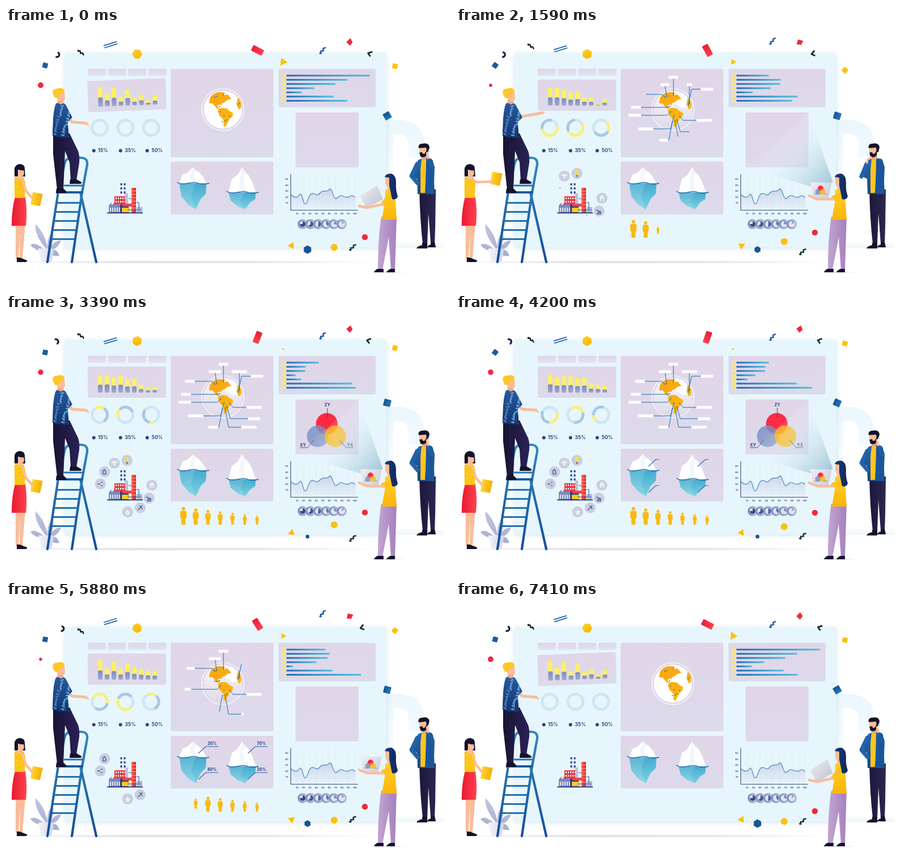
An HTML page with a canvas for the animation above (7440 ms loop, 782 by 457 pixels).

```html
<!DOCTYPE html>
<html lang="en">
<head>
<meta charset="utf-8">
<title>Dashboard team</title>
<style>
html, body { margin: 0; width: 100%; height: 100%; overflow: hidden; background: #fff; }
canvas { display: block; width: 782px; height: 457px; }
</style>
</head>
<body>
<canvas id="stage"></canvas>
<script>
const W = 782, H = 457, LOOP = 7440, TAU = Math.PI * 2, RAD = Math.PI / 180;
const canvas = document.getElementById('stage');
const dpr = window.devicePixelRatio || 1;
canvas.width = W * dpr;
canvas.height = H * dpr;
const c = canvas.getContext('2d');
let t = 0;

// ---- timing ----
const clamp = x => Math.max(0, Math.min(1, x));
const ease = x => { x = clamp(x); return x * x * (3 - 2 * x); };
const mix = (a, b, u) => a + (b - a) * u;
const env = (a, b, d, e) => ease((t - a) / (b - a)) * (1 - ease((t - d) / (e - d)));
const pop = x => { x = clamp(x) - 1; return 1 + 2.2 * x * x * x + 1.2 * x * x; };
// Cosine swing, n times per loop, highest at the given phase.
const sway = (mid, amp, peak = 0, n = 1) => mid + amp * Math.cos(n * TAU * t / LOOP - peak);

// ---- drawing helpers ----
function grad(x0, y0, x1, y1, ...cols) {
  const g = c.createLinearGradient(x0, y0, x1, y1);
  cols.forEach((k, i) => g.addColorStop(i / (cols.length - 1), k));
  return g;
}
function fill(d, col) { c.fillStyle = col; c.fill(new Path2D(d)); }
function stroke(d, col, w = 1) { c.strokeStyle = col; c.lineWidth = w; c.stroke(new Path2D(d)); }
function box(x, y, w, h, r, col) {
  c.fillStyle = col; c.beginPath(); c.roundRect(x, y, w, h, r); c.fill();
}
function disc(x, y, r, col) {
  c.fillStyle = col; c.beginPath(); c.arc(x, y, Math.max(0, r), 0, TAU); c.fill();
}
function ring(x, y, r, w, col, a = 0, b = TAU) {
  c.strokeStyle = col; c.lineWidth = w; c.beginPath(); c.arc(x, y, r, a, b); c.stroke();
}
function place(x, y, rot, s, draw) {
  c.save(); c.translate(x, y); c.rotate(rot * RAD); c.scale(s, s); draw(); c.restore();
}
function fade(a, draw) {
  if (a <= 0) return;
  c.save(); c.globalAlpha *= a; draw(); c.restore();
}
function text(s, x, y, size, col = '#36437f', align = 'center') {
  c.font = `700 ${size}px Inter, "Open Sans", sans-serif`;
  c.textAlign = align; c.textBaseline = 'middle'; c.fillStyle = col; c.fillText(s, x, y);
}
function poly(pts, col) {
  c.fillStyle = col; c.beginPath(); pts.forEach(p => c.lineTo(p[0], p[1])); c.closePath(); c.fill();
}
function ngon(n, r, col) {
  poly(Array.from({ length: n }, (_, i) => [r * Math.cos(i * TAU / n), r * Math.sin(i * TAU / n)]), col);
}
function limb(pts, w, col) {
  c.strokeStyle = col; c.lineWidth = w; c.beginPath();
  pts.forEach(p => c.lineTo(p[0], p[1])); c.stroke();
}
// Draws the first part u of a polyline.
function trace(pts, u, col, w = 1) {
  const len = pts.slice(1).map((p, i) => Math.hypot(p[0] - pts[i][0], p[1] - pts[i][1]));
  let left = clamp(u) * len.reduce((a, b) => a + b, 0);
  if (left <= 0) return;
  c.strokeStyle = col; c.lineWidth = w; c.beginPath(); c.moveTo(...pts[0]);
  for (let i = 0; i < len.length && left > 0; i++) {
    const k = Math.min(1, left / (len[i] || 1));
    c.lineTo(mix(pts[i][0], pts[i + 1][0], k), mix(pts[i][1], pts[i + 1][1], k));
    left -= len[i];
  }
  c.stroke();
}

const SKIN = '#f9bd9b', INK = '#14132b', GOLD = '#fdb813', BLUE = '#1c6cb0', RED = '#ee2a3d';

// ---- board ----
function backdrop() {
  c.fillStyle = '#fff'; c.fillRect(0, 0, W, H);
  fill('M668 162H694Q737 166 737 208V228H709V208Q709 187 690 187H682V300H668Z',
    grad(0, 163, 0, 300, '#eaf7fd', '#fbfeff'));
  box(668, 377, 104, 11, 2, grad(0, 377, 0, 388, '#fff', '#ecf6fc'));
  c.fillStyle = grad(10, 0, 655, 0, '#fff', '#dfe2ea', '#e4e7ee', '#fff');
  c.fillRect(10, 411, 645, 4);
  c.fillStyle = grad(640, 0, 705, 0, '#fff', '#dde0ea', '#fff');
  c.fillRect(640, 430, 65, 2);
  c.save();
  c.shadowColor = 'rgba(125,175,205,.32)'; c.shadowBlur = 8 * dpr; c.shadowOffsetY = 2 * dpr;
  box(103, 44, 567, 343, 5, '#e7f6fc');
  c.restore();
}
function panel(x, y, w, h) {
  box(x, y, w, h, 3, grad(0, y, 0, y + h, '#e1d6e8', '#dcdaeb'));
}
function tabs() {
  for (let i = 0; i < 4; i++)
    box(144 + i * 35.6, 72, 32, 12.5, 2, grad(0, 72, 0, 85, '#dfd5e8', '#e2e4f1'));
}

// Even columns stay tall, odd ones swell in turn from left to right.
function columns() {
  place(213, 118, -2.1 * (1 - env(500, 1350, 6250, 7100)), 1, () => {
    c.translate(-213, -118);
    panel(144, 91, 138, 55);
    for (let i = 0; i < 9; i++) {
      const odd = i % 2, tall = 30 - i * 1.6 - (i > 5 ? 7 : 0);
      const h = tall + (odd ? sway(-2, 7, 1.7 + .4 * i) : sway(3, 3, 5.5));
      const x = 162 + i * 12, top = 137 - h, mid = top + h * .54;
      box(x, top, 8, mid - top + 2, 1, '#fdef59');
      c.fillStyle = 'rgba(255,255,255,.4)';
      for (let y = top + 3; y < mid; y += 3) c.fillRect(x, y, 8, .7);
      box(x, mid, 8, 137 - mid, 2, grad(0, mid, 0, 137, '#7e8dbb', '#a4a9cb'));
    }
  });
}

function donuts() {
  const on = env(150, 1000, 6200, 7100);
  for (let i = 0; i < 3; i++) {
    const x = 165 + i * 45.3, turns = 2 - i / 2;
    const a = (turns * clamp((t - 1000) / 5300) - .25) * TAU;
    const len = on * (i < 2 ? 125 : 55) * RAD * sway(1, .45, 2.7, 2);
    ring(x, 176, 13.5, 5, '#cde6f5');
    if (on > .01) {
      ring(x, 176, 13.5, 5, '#a8c7e6', a + len, a + len + 2 * on);
      ring(x, 176, 13.5, 5, '#fcf078', a, a + len);
    }
    disc(154.7 + i * 47, 216.5, 3, '#36437f');
    text(`${[15, 35, 50][i]}%`, 162 + i * 47.3, 216.8, 8.5, '#36437f', 'left');
  }
}

// Upper rows stretch around the loop's end, the others drift.
function rows() {
  panel(480, 72, 171, 68);
  const burst = 1 - env(0, 1400, 5500, 7200);
  [57, 56, 55, 38, 20, 98, 117].forEach((rest, i) => {
    const drift = i > 4 ? sway(0, 20, 1.8 * i - 6.6)
      : i === 4 ? sway(0, 10, 1.9) : i ? sway(0, 22, 2.6, 2) : 0;
    const w = rest + drift + Math.max(0, 90 - 20 * i) * burst, y = 84 + i * 7.4;
    box(487, y - 2.5, 6, 5, 1, '#fbe966');
    c.fillStyle = grad(494, 0, 494 + w, 0, '#2469b4', '#55bfdd');
    c.fillRect(494, y - 1.5, w, 3);
  });
}

// Callouts: point on the globe, then the middle of the label.
const CALLS = [
  [383, 118, 383, 87], [409, 136, 442, 108], [394, 156, 437, 163], [376, 139, 317, 140],
  [378, 148, 315, 154], [384, 155, 334, 178], [381, 165, 365, 198], [371, 121, 368, 100],
  [411, 133, 411, 100], [368, 122, 324, 117], [389, 162, 437, 183], [386, 164, 428, 198]
];
function globe() {
  panel(290, 72, 181, 156);
  ring(382, 144, 37, 1.2, '#fff');
  disc(382, 144, 33.5, '#fff');
  const on = env(300, 1100, 6200, 7100);
  fade(on, () => {
    disc(382, 144, 33.5, grad(0, 115, 0, 175, 'rgba(222,216,233,.2)', 'rgba(222,216,233,.95)'));
    fill('M386 117L400 115 409 126 411 139 399 142 386 132Z', '#fff');
  });
  const land = grad(358, 115, 410, 175, '#f7a413', '#fdbb0f');
  fill('M358 133L359 124Q364 114 376 113L386 114 383 119 390 117 397 125 390 127 385 131 380 133 380 136 376 135 372 138 375 142 380 143 377 145 370 141 364 133Z', land);
  fill('M373 146L379 141 389 142 393 146 400 150 399 156 394 160 390 168 386 175 383 172 383 162 376 155Z', land);
  fill('M408 123Q416 130 414 141L410 144 406 134Z', land);
  CALLS.forEach(([x, y, lx, ly], i) => {
    const a = 700 + i * 60, b = 5200 + (i * 5 + 11) % 12 * 65;
    const g = env(a, a + 650, b, b + 700), w = 17 + i % 3 * 5;
    const side = Math.sign(lx - x), flat = Math.abs(lx - x) > 15;
    const end = lx - side * w / 2, bend = x + side * Math.min(6, Math.abs(lx - x));
    disc(x, y, .9, BLUE);
    trace([[x, y], [bend, ly], [flat ? end : lx, ly]], g * 1.7, BLUE);
    const k = ease(g * 2 - 1) * w;
    if (k > .4) box(flat ? end - (side < 0 ? k : 0) : lx - k / 2, ly - 2.6, k, 5.2, 1, '#fff');
  });
}

function berg(x, sea, top, low) {
  const up = sea - 246, down = 320 - sea;
  const above = (px, k) => [x + px, 246 + up * k], below = (px, k) => [x + px, sea + down * k];
  poly([above(0, 0), above(6, .2), above(11, .3), above(18, .6), above(24, 1), above(-24, 1), above(-18, .45), above(-9, .32)], '#fff');
  poly([above(0, 0), above(6, .2), above(2, .5), above(6, 1), above(-2, 1), above(-5, .6)], 'rgba(220,235,245,.4)');
  poly([below(-24, 0), below(24, 0), below(23, .4), below(14, .6), below(5, 1), below(-8, .82), below(-20, .5)],
    grad(0, sea, 0, 320, '#46a9cf', '#79d3e2'));
  poly([below(-24, 0), below(4, 0), below(-3, .5), below(5, 1), below(-8, .82), below(-20, .5)], 'rgba(255,255,255,.13)');
  place(x, sea, 0, 1, () => stroke('M-28 -2Q-20 3 -8 0T10 0T29 0', '#256ba4', 1.3));
  const g = env(3850, 4480, 6350, 7050);
  [[255, top], [301, low]].forEach(([y, s]) => {
    trace([[x + 10, y + 12], [x + 23, y], [x + 45, y]], g, '#236ba9', 1.1);
    fade(ease((g - .72) / .28), () => text(s, x + 34, y - 4.8, 7, '#283a83'));
  });
}

function lineChart() {
  const d = 'M502 294Q508 300 513 298C518 296 517 289 521 296C524 307 526 315 530 308C533 299 535 291 541 292S547 298 553 291S565 291 569 285C574 279 575 297 580 301C585 302 586 293 592 296S602 300 606 297S612 297 615 299';
  for (let i = 1; i <= 10; i++) stroke(`M${501.5 + i * 11.3} 260V320`, 'rgba(176,190,218,.25)', .7);
  fill(d + 'V320H502Z', grad(0, 284, 0, 320, 'rgba(176,178,215,.5)', 'rgba(222,226,243,.25)'));
  stroke(d, '#4b83b9', 1.2);
  stroke('M501.5 258V321.5H620', '#33507f', 1.1);
  for (let i = 1; i <= 10; i++) {
    if (i < 6) text(i * 10, 497, 319.5 - i * 10.5, 4.1, '#36437f', 'right');
    text(i * 10, 501.5 + i * 11.3, 327.5, 3.9);
  }
  for (let i = 0; i < 6; i++) {
    const x = 522.5 + i * 13.8;
    disc(x, 346, 8.8, grad(x - 8, 0, x + 8, 0, '#7d8bb9', '#b4bdda'));
    disc(x, 346, 5.6, '#dfe4f1');
    c.fillStyle = `hsl(224 ${45 - i * 4}% ${36 + i * 6}%)`; c.beginPath(); c.moveTo(x, 346);
    c.arc(x, 346, 5, -1.57, -1.3 + (6 - i) * .75); c.fill();
  }
}

function vennDots() {
  disc(0, -14, 19, 'rgba(255,28,54,.92)');
  disc(-16, 8, 19, 'rgba(123,145,197,.8)');
  disc(15, 8, 19, 'rgba(253,187,10,.8)');
}
function venn() {
  panel(510, 149, 111, 97);
  const g = env(1680, 2300, 5250, 5800), u = env(2000, 2500, 5200, 5550);
  if (g > .01) place(565, 206, 0, g, vennDots);
  trace([[566, 181], [566, 164]], u, '#283a83', .9);
  trace([[542, 221], [531, 234], [518, 234]], u, '#283a83', .9);
  trace([[588, 221], [599, 234], [612, 234]], u, '#283a83', .9);
  fade(ease(u * 2 - 1), () => {
    text('ZY', 566, 158.5, 7.5); text('XY', 523, 230, 7.5); text('YX', 606, 230, 7.5);
  });
}

function crowd() {
  for (let i = 0; i < 7; i++) {
    const s = pop((t - 1010 - i * 265) / 360) * (1 - ease((t - 5500 - i * 215) / 400));
    if (t < 1010 + i * 265 || s < .02) continue;
    const h = 31 - i * 2.5;
    place(312.5 + i * 21.6, 354.5 + i * 1.25, 0, s, () => {
      disc(0, -h * .41, h * .1, GOLD);
      box(-h * .18, -h * .29, h * .36, h * .44, h * .09, GOLD);
      box(-h * .12, 0, h * .24, h * .5, h * .05, GOLD);
    });
  }
}

// Two arcs of four badges around the plant: upper left, then lower right.
const GLYPHS = [
  'M-2 -1A3 3 0 1 1 2 -1L1 3H-1Z', 'M-4 -4V-1H4V-4M0 -5V3M-2 3H2', 'M-3 4V-2L0 -4 2 1V4Z', 'M-5 0H0M1 -3H4M1 3H4',
  'M-3 5L-1 -5M3 5L1 -5M-4 -1H4', 'M-5 -2L4 2M0 0L-3 5H3Z', 'M-4 4L4 -4M-1 -4L4 2', 'M-4 0H4M0 -4V0M-2 1V4H2V1'
];
function icons() {
  GLYPHS.forEach((d, i) => {
    const j = i % 4, a = j < 2 ? 780 : 1000 + 240 * j, b = 4850 + 580 * j;
    const s = env(a, a + 430, b, b + 480);
    if (s < .03) return;
    const ang = (i < 4 ? -88 - 29 * j : -2 + 29.5 * j) * RAD, r = 45.5 * (.7 + .3 * s);
    place(211.5 + r * Math.cos(ang), 302 + r * Math.sin(ang), 0, s, () => {
      disc(0, 0, 9.7, '#c9cee0');
      if (i) stroke(d, i % 3 === 1 ? '#fff' : '#4d5f9b', 1.5);
      else { fill(d, '#fce23a'); box(-1.3, 3, 2.6, 3, 0, '#526099'); }
    });
  });
}
function factory() {
  for (const x of [201.5, 207.5])
    for (let i = 0; i < 6; i++) box(x, 274 + i * 3.6, 3, 3.7, 0, i % 2 ? '#dfe5f2' : '#233e8d');
  box(191, 297, 24, 17, 0, '#e73442');
  for (let x = 193; x < 214; x += 4)
    for (const y of [299, 305]) box(x, y, 2, 3, 0, '#fff');
  box(210, 292, 5, 32, 0, '#c0bed8');
  box(221, 282, 8, 44, 1, grad(221, 0, 229, 0, '#ff5948', '#d72a36'));
  for (let y = 287; y < 323; y += 6) box(221, y, 8, 1.2, 0, '#ff9578');
  fill('M181 326V313L186 308V313L191 308V313L196 308V313L201 308V326Z', '#7d8ab9');
  for (let x = 183; x < 200; x += 4) box(x, 317, 2, 7, 0, '#dfe4f4');
  fill('M201 312H216V326H201Z', '#293e83');
  box(204, 317, 14, 8, 1, '#fbc928');
  box(205, 310, 17, 5, 0, '#ef4349');
  box(230, 316, 10, 10, 1, '#aab9da');
  stroke('M214 321H238M230 308H234V319M216 301H221', '#3456a2', 1.1);
  box(178, 325.5, 63, 1.8, 0, '#22377c');
}

// ---- people ----
function plant() {
  const leaf = grad(0, 345, 0, 405, '#c0c6e1', '#a5add1');
  fill('M70 389Q49 363 52 346Q69 363 73 388Z', leaf);
  fill('M73 390Q72 366 83 361Q86 376 76 391Z', leaf);
  fill('M67 390Q50 376 43 383Q50 393 67 393Z', leaf);
  fill('M75 391Q85 374 97 375Q93 388 77 394Z', leaf);
  fill('M75 394Q89 386 94 402Q84 404 75 397Z', leaf);
  fill('M57 389H85L80 413H62Z', grad(57, 0, 85, 0, '#f5f5fa', '#cfd3e7'));
}
function ladder() {
  const col = grad(0, 228, 0, 413, '#3288bd', '#144f9b');
  stroke('M131 290L159 413', col, 4.2);
  for (let i = 0; i < 5; i++) box(90 - i * 2.5, 307 + i * 16, 42 - i * .2, 3, 0, '#2070b0');
  stroke('M73 413L92 289L103 240Q105 229 116 229H132Q144 229 143 241L134 290L116 413', col, 4.2);
  stroke('M103 278H134', '#2877b1', 3);
  box(88, 288, 48, 4, 1, '#195ba0');
}
function climber() {
  fill('M83 186H112L127 217Q130 225 129 238L124 269H114L112 237 104 217 103 240 101 285H90Q86 250 83 222Z',
    grad(80, 0, 130, 0, '#171331', '#2b2257'));
  fill('M89 283H101L107 289Q107 291 104 291H88Z', INK);
  fill('M113 267H124L133 272Q134 275 130 275H112Z', INK);
  const u = env(500, 1250, 1700, 2500), hx = mix(141, 151, u), hy = mix(168, 150, u);
  limb([[104, mix(153, 151, u)], [116, mix(166, 156, u)], [hx, hy]], 5.2, SKIN);
  limb([[hx - 2, hy], [hx + 4, hy + mix(3, -1, u)]], 2.8, SKIN);
  c.save();
  c.beginPath();
  const shirt = new Path2D('M88 133Q98 128 105 135L113 150 117 158 109 166 111 193Q95 195 82 190Q82 145 88 133Z');
  c.clip(shirt);
  c.fillStyle = grad(0, 132, 0, 193, '#255a9f', '#16356f'); c.fill(shirt);
  for (let i = 0; i < 24; i++) {
    const x = 85 + i * 11 % 32, y = 136 + i * 17 % 56;
    place(x, y, i * 70, 1, () => fill('M-4 0Q0 -4 4 0Q0 3 -4 0Z', i % 3 ? '#5e9bcd' : '#3f7bb8'));
  }
  c.restore();
  fill('M91 122H101V133Q96 137 91 132Z', '#f0a987');
  fill('M89 113H103L104 123Q104 130 98 130 92 129 89 122Z', SKIN);
  fill('M83 117Q80 107 90 107Q101 104 103 111L102 116H95L92 124 86 123Z', '#fec727');
}
function readerWoman() {
  const u = env(450, 1300, 1800, 3350), x = mix(54, 71, u), y = mix(302, 266, u);
  fill('M17 346H34L29 407H24L25 360 22 407H17Z', SKIN);
  fill('M19 405H24L37 410Q38 413 34 413H19Z', INK);
  fill('M16 298H34Q38 324 35 349H10Q10 319 16 298Z', grad(10, 0, 37, 0, '#e9192f', '#ff4451'));
  fill('M15 264Q25 260 31 264L34 273 33 300H15Z', '#fcc415');
  for (let i = 0; i < 9; i++) disc(18 + i * 5 % 14, 268 + i * 7 % 30, .8, '#fff1a3');
  place(x, y, 10, 1, () => fill('M-9 -11H9L8 11H-9Z', grad(-9, 0, 9, 0, '#ffd426', '#f3ae09')));
  limb([[29, 268], [mix(35, 37, u), mix(287, 272, u)], [x - 8, y + mix(-2, 5, u)]], 4.3, SKIN);
  fill('M15 261V248Q17 240 25 240Q33 241 33 248L34 262H15Z', INK);
  fill('M20 250H31L32 256Q31 262 27 262V267H20Z', SKIN);
  fill('M19 247Q25 240 32 248L31 251Q25 252 21 249L21 261 15 262Z', INK);
}
function tabletWoman() {
  const beam = env(950, 1400, 5300, 5750);
  fade(beam, () => poly([[621, 151], [664, 272], [627, 280], [510, 246]],
    grad(650, 277, 560, 195, 'rgba(150,190,208,.75)', 'rgba(205,228,238,.4)', 'rgba(255,255,255,.05)')));
  fill('M661 333H688L685 427H678L674 369 663 427H655Q655 370 661 333Z', grad(655, 0, 688, 0, '#c1a5d3', '#a680bd'));
  fill('M654 425H665V431H648Q649 428 654 425Z', INK);
  fill('M677 425H685V431H670Q671 428 677 425Z', INK);
  fill('M668 286Q676 280 685 287L688 338H662L667 309Z', grad(0, 285, 0, 338, '#ffcf24', '#fbb50b'));
  const u = env(600, 1250, 5900, 6750), m = (a, b) => mix(a, b, u);
  const pts = [[m(624, 624), m(296, 272)], [m(654, 662), m(278, 273)], [m(664, 656), m(302, 300)], [m(635, 629), m(318, 300)]];
  poly(pts, grad(624, 272, 662, 305, '#f0f0f5', '#c8c9d6'));
  fade(env(800, 1250, 5950, 6500), () => {
    place(642, 287, 0, .27, () => {
      stroke('M-14 10L-27 22H-42M14 10L27 22H42M0 -17V-34', '#576aab', 3);
      vennDots();
    });
  });
  limb([[677, 296], [665, m(310, 300)]], 9, '#fdc11b');
  limb([[664, m(311, 302)], [636, m(317, 302)], [622, m(314, 296)]], 4.5, SKIN);
  fill('M668 261H678V283Q673 288 671 280L668 274Z', SKIN);
  fill('M667 263Q669 256 679 257Q687 260 687 273Q686 286 690 297Q688 304 680 302L675 278V264Z', grad(667, 0, 690, 0, '#173a79', '#14275c'));
}
function callerMan() {
  const u = env(800, 1300, 1850, 2500), nod = -3 * env(5350, 5800, 6000, 6700);
  fill('M728 285H757L756 351 755 380H748L744 327 742 381H734Q729 337 728 285Z', grad(727, 0, 758, 0, '#1a1739', '#2c2752'));
  fill('M733 379H742V389H723Q724 385 733 383Z', INK);
  fill('M748 378H755L757 387H742Q742 384 748 382Z', INK);
  fill('M726 233Q737 227 750 231L755 245 753 293H725L724 266 711 260Z', grad(0, 230, 0, 293, '#2466ac', '#184887'));
  fill('M732 231H741L738 291H730L730 249Z', '#fcc522');
  fill('M740 230L752 234 755 293H739Z', '#1b5599');
  place(735, 216, nod, 1, () => {
    c.translate(-735, -216);
    fill('M731 221H742V231Q736 235 732 230Z', '#eaa583');
    fill('M728 209H744L742 222 738 227Q733 228 730 224L728 219Z', SKIN);
    fill('M727 212Q725 204 734 204Q744 202 746 210L744 219H741L740 211Z', INK);
    fill('M728 220L733 219 734 222 737 222 741 216 741 224Q737 230 730 227Z', INK);
  });
  limb([[724, 240], [714, mix(261, 262, u)], [mix(725, 723, u), mix(274, 240, u)]], 7, '#2163aa');
  fade(u, () => limb([[724, 238], [725, 232], [731, 228]], 3.5, SKIN));
  fade(1 - u, () => {
    limb([[751, 246], [743, 231]], 6, '#1d5da3');
    limb([[743, 229], [742, 221]], 4.5, SKIN);
    place(744, 219, 18, 1, () => box(-1, -5, 2.6, 9, 1, '#e1e4ec'));
  });
}

// ---- confetti ----
const zigzag = col => stroke('M-6 4L-3 5L-3 1L2 1L2 -3L7 -4', col, 2.5);
const square = (r, col) => box(-r, -r, 2 * r, 2 * r, 1, col);
function confetti() {
  place(sway(90, 8, -1.6), 47, sway(0, 25), 1, () => ring(0, 0, 4.2, 3.1, '#18183c', -1.7, 1.7));
  place(132, sway(41, 10, 4.9), 78, .9, () => zigzag('#16182d'));
  place(184, sway(37.5, 8, 3), -17, 1, () => stroke('M-12 -2H12M-12 2H12', '#1d65ad', 1.8));
  place(231, 46, sway(25, 20, 3, 3), 1, () => ngon(6, 8.9, grad(-8, -8, 8, 8, '#ffcf2a', '#f5b400')));
  place(443, 39.5, sway(70, 43, 3.1), 1, () => box(-10.5, -5.5, 21, 11, 1.5, grad(-10, 0, 10, 0, '#e91e39', '#ff4150')));
  place(488, 60, 6, sway(.65, .36), () => ngon(3, 8, '#fbc20d'));
  place(557, sway(30, 10, .3, 2), -10, 1, () => zigzag('#1d5fa9'));
  place(605, 25, sway(42, -32, 0, 2), 1, () => fill('M0 -7L5.5 -1L2 6L-5.5 1Z', RED));
  place(sway(634, 7, .3, 2), 45, sway(-6, 18, .3, 2), 1, () => stroke('M4 -4L-3 0L2 5', '#102c27', 2.8));
  place(685, sway(61, 14, 1.1), sway(27, -15, 0, 2), 1, () => square(4.5, '#fbc20d'));
  place(671.5, 155, sway(33, 27, 0, 3), 1, () => square(6.2, grad(-6, 0, 6, 0, '#19518f', '#2478ba')));
  disc(632, sway(358.5, 10.5), 5.2, RED);
  place(503, 384, sway(130, 50, .3, 2), 1, () => ngon(3, 7, '#fbbd0d'));
  place(531, 391, 30, sway(.74, .26), () => ngon(6, 7.5, '#175596'));
  place(578, sway(379, 9, 5.8), sway(25, 15, 2.3), 1, () => ngon(6, 6.6, '#fac114'));
  place(610, sway(389.5, 6.5, 2), -4, 1, () => zigzag('#13392f'));
  place(69, 66, sway(20, 18, 4.4, 3), 1, () => square(4.5, '#1e5aa0'));
  disc(61, 101, sway(3.8, 1.2, .2, 2), RED);
}

function draw(now) {
  t = now % LOOP;
  c.setTransform(dpr, 0, 0, dpr, 0, 0);
  c.lineCap = 'butt'; c.lineJoin = 'round';
  backdrop();
  tabs(); columns(); donuts(); rows(); globe();
  panel(290, 236, 181, 93);
  berg(329, 274, '20%', '80%');
  berg(416, 290, '70%', '30%');
  lineChart(); venn(); crowd(); icons(); factory(); confetti();
  c.lineCap = 'round';
  plant(); ladder(); climber(); readerWoman(); callerMan(); tabletWoman();
}
const start = performance.now();
function loop() {
  draw(performance.now() - start);
  requestAnimationFrame(loop);
}
loop();
</script>
</body>
</html>
```
